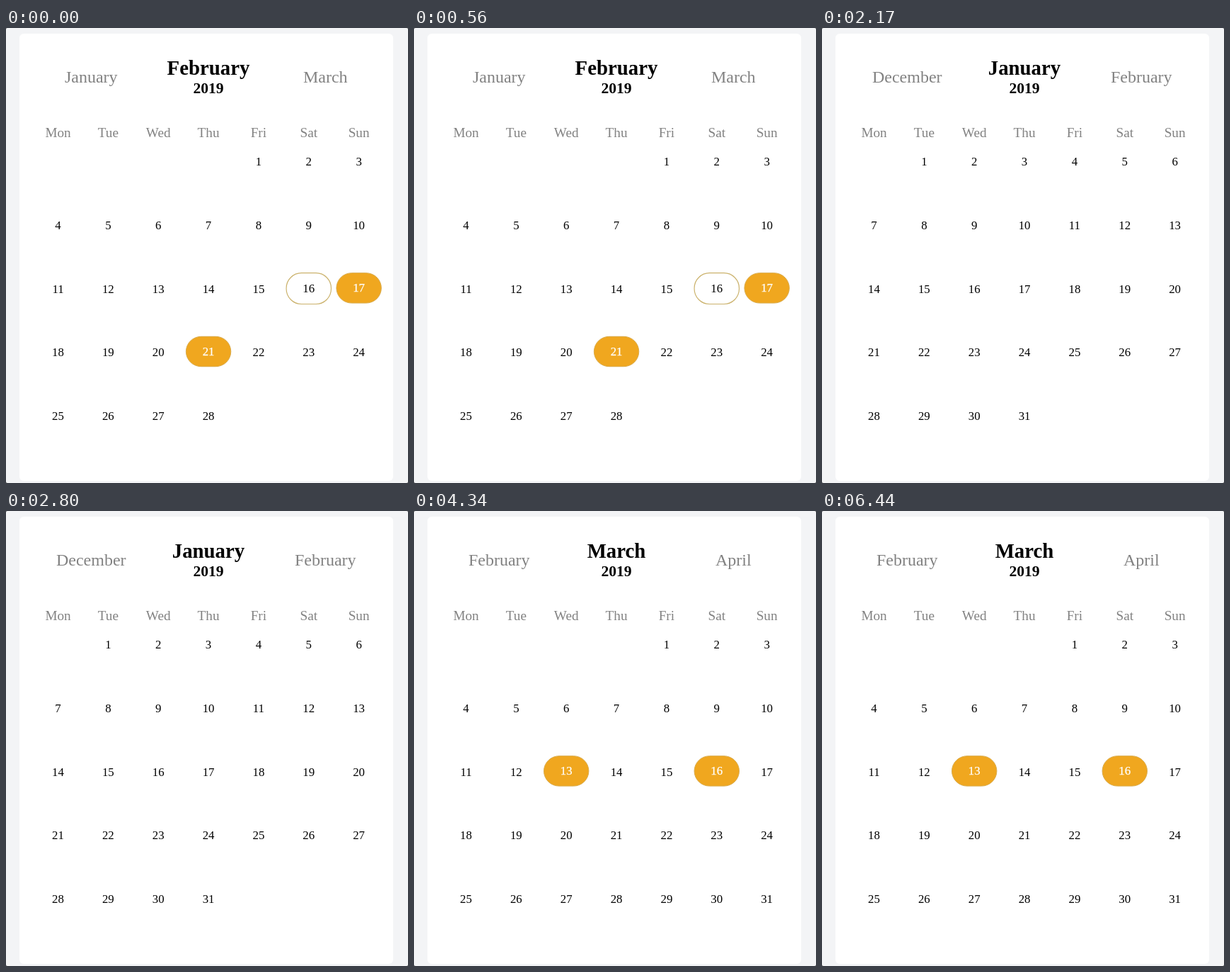
These frames come from a looping animation (568x642 px, 8 s). An HTML page:

```html
<!DOCTYPE html>
<html lang="en">
<head>
<meta charset="utf-8">
<title>Calendar</title>
<style>
html, body { margin: 0; width: 100%; height: 100%; overflow: hidden; background: #555; }
svg { display: block; width: 568px; height: 642px; }
text { font-family: "Liberation Serif", "Times New Roman", serif; text-anchor: middle; }
.title { font-size: 28.8px; font-weight: bold; }
.year { font-size: 21.6px; font-weight: bold; }
.side { font-size: 24px; fill: #828282; }
.weekday { font-size: 19.2px; fill: #828282; }
.day { font-size: 16.8px; }
.marked { fill: #fff; stroke: #fff; stroke-width: .25px; }
.pill { fill: #f0a71f; stroke: #d9ab4c; }
.today { fill: none; stroke: #cbb26c; stroke-width: 1.2px; }
.month { visibility: hidden; animation: 8s step-end infinite; }
#feb { animation-name: feb; }
#jan { animation-name: jan; }
#mar { animation-name: mar; }
@keyframes feb {
  0%, 37.625% { visibility: visible; }
  19.25%, 54.25%, 100% { visibility: hidden; }
}
@keyframes jan {
  0%, 37.625%, 100% { visibility: hidden; }
  19.25% { visibility: visible; }
}
@keyframes mar {
  0% { visibility: hidden; }
  54.25%, 100% { visibility: visible; }
}
</style>
</head>
<body>
<svg viewBox="0 0 568 642">
  <rect width="568" height="642" rx="2" fill="#f3f4f6"/>
  <rect x="19" y="8" width="528" height="631" rx="6" fill="#fff"/>
  <g id="calendar"></g>
</svg>
<script>
const months = [
  { id: "feb", names: ["January", "February", "March"], offset: 4, length: 28, marked: [17, 21], today: 16 },
  { id: "jan", names: ["December", "January", "February"], offset: 1, length: 31, marked: [] },
  { id: "mar", names: ["February", "March", "April"], offset: 4, length: 31, marked: [13, 16] }
];
const columnX = i => 73.5 + 70.85 * i;
const rowY = i => 194.3 + 89.6 * i;

const text = (x, y, style, content) =>
  `<text x="${x}" y="${y}" class="${style}">${content}</text>`;

const pill = (x, y, height, style) =>
  `<rect x="${x - 31.7}" y="${y}" width="63.4" height="${height}" rx="21.5" class="${style}"/>`;

function drawDay(month, day) {
  const cell = month.offset + day - 1;
  const x = columnX(cell % 7);
  const y = rowY(Math.floor(cell / 7));
  if (month.marked.includes(day))
    return pill(x, y - 27.8, 42.4, "pill") + text(x, y - 1.6, "day marked", day);
  if (day === month.today)
    return pill(x, y - 27.8, 43.8, "today") + text(x, y - .8, "day", day);
  return text(x, y, "day", day);
}

function drawMonth(month) {
  const [previous, current, next] = month.names;
  const days = Array.from({ length: month.length }, (_, i) => drawDay(month, i + 1));
  return `<g class="month" id="${month.id}">` +
    text(120.3, 77, "side", previous) +
    text(286, 66, "title", current) +
    text(451.3, 77, "side", next) +
    days.join("") + "</g>";
}

const weekdays = ["Mon", "Tue", "Wed", "Thu", "Fri", "Sat", "Sun"];
document.getElementById("calendar").innerHTML =
  text(286, 92, "year", 2019) +
  weekdays.map((name, i) => text(columnX(i), 154, "weekday", name)).join("") +
  months.map(drawMonth).join("");
</script>
</body>
</html>
```
